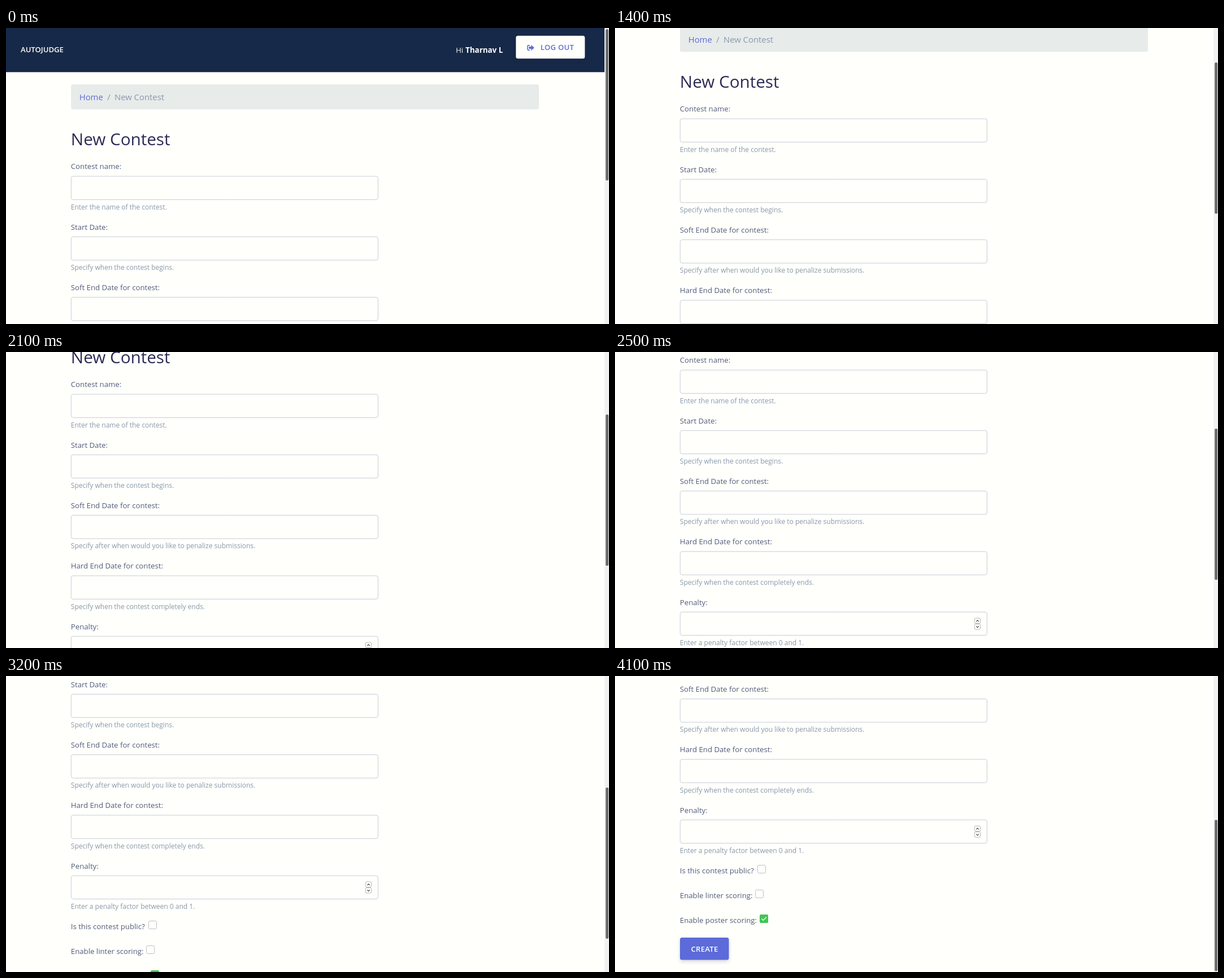
Recreate the animation shown at these times as an HTML page with a canvas. Size 1067 px wide and 525 px high, loop 6.1 s.

```html
<!DOCTYPE html>
<html lang="en">
<head>
<meta charset="utf-8">
<title>New Contest</title>
<style>
  html, body { margin: 0; width: 100%; height: 100%; overflow: hidden; background: #fffffc; }
  canvas { display: block; }
</style>
</head>
<body>
<canvas id="stage" width="1067" height="525"></canvas>
<script>
const ctx = document.getElementById('stage').getContext('2d');
const W = 1067, H = 525, LOOP = 6100, STEP = 100, LEFT = 114.8;
const PAPER = '#fffffc', NAVY = '#172948', INDIGO = '#5c6bd9',
      SLATE = '#525c7a', MUTED = '#8898aa', LINE = '#c9ccd6';

// Scroll offset over time: [ms, px]
const KEYS = [[900, 0], [1000, 2], [1200, 44], [1400, 102], [1600, 160], [1700, 160],
  [1800, 162], [1900, 162], [2100, 188], [2900, 278], [3500, 393], [4100, 437]];
const MAX_SCROLL = 437;

const FIELDS = [
  ['Contest name:', 'Enter the name of the contest.'],
  ['Start Date:', 'Specify when the contest begins.'],
  ['Soft End Date for contest:', 'Specify after when would you like to penalize submissions.'],
  ['Hard End Date for contest:', 'Specify when the contest completely ends.'],
  ['Penalty:', 'Enter a penalty factor between 0 and 1.']
];
const PITCH = 107.3;

const secant = i => (KEYS[i + 1][1] - KEYS[i][1]) / (KEYS[i + 1][0] - KEYS[i][0]);

// Harmonic mean keeps the curve monotone
function slope(i) {
  if (i === 0 || i === KEYS.length - 1) return 0;
  const a = secant(i - 1), b = secant(i);
  return a * b > 0 ? 2 * a * b / (a + b) : 0;
}

function scrollAt(t) {
  if (t <= KEYS[0][0]) return 0;
  const i = KEYS.findIndex(k => k[0] >= t) - 1;
  if (i < 0) return MAX_SCROLL;
  const [t0, a] = KEYS[i], [t1, b] = KEYS[i + 1];
  const d = t1 - t0, u = (t - t0) / d, v = 1 - u;
  return Math.round(a * v * v * (1 + 2 * u) + b * u * u * (3 - 2 * u) +
    d * u * v * (v * slope(i) - u * slope(i + 1)));
}

function text(str, x, y, size, color, weight = 400, spacing = 0) {
  ctx.font = `${weight} ${size}px "Open Sans", sans-serif`;
  ctx.letterSpacing = spacing + 'px';
  ctx.fillStyle = color;
  ctx.fillText(str, x, y);
}

function box(x, y, w, h, r, fill, stroke) {
  ctx.beginPath();
  ctx.roundRect(x, y, w, h, r);
  if (fill) { ctx.fillStyle = fill; ctx.fill(); }
  if (stroke) { ctx.strokeStyle = stroke; ctx.lineWidth = 1; ctx.stroke(); }
}

function polyline(points, color, width) {
  ctx.beginPath();
  points.forEach(([x, y]) => ctx.lineTo(x, y));
  ctx.strokeStyle = color;
  ctx.lineWidth = width;
  ctx.stroke();
}

function button(x, y, w, h, fill) {
  ctx.save();
  ctx.shadowColor = 'rgba(25,30,60,.18)';
  ctx.shadowBlur = 6;
  ctx.shadowOffsetY = 3;
  box(x, y, w, h, 3.5, fill);
  ctx.restore();
}

function exitIcon(x, y) {
  ctx.save();
  ctx.translate(x, y);
  ctx.lineJoin = 'round';
  ctx.beginPath();
  ctx.moveTo(4.8, 2.4);
  ctx.lineTo(2.4, 2.4);
  ctx.quadraticCurveTo(.8, 2.4, .8, 4);
  ctx.lineTo(.8, 9);
  ctx.quadraticCurveTo(.8, 10.6, 2.4, 10.6);
  ctx.lineTo(4.8, 10.6);
  ctx.strokeStyle = ctx.fillStyle = INDIGO;
  ctx.lineWidth = 1.6;
  ctx.stroke();
  ctx.beginPath();
  [[3.6, 5], [7.7, 5], [7.7, 2.2], [12.3, 6.5], [7.7, 10.8], [7.7, 8], [3.6, 8]]
    .forEach(([px, py]) => ctx.lineTo(px, py));
  ctx.closePath();
  ctx.lineWidth = .8;
  ctx.fill();
  ctx.stroke();
  ctx.restore();
}

function header() {
  ctx.fillStyle = NAVY;
  ctx.fillRect(0, 0, 1059, 78.3);
  text('AUTOJUDGE', 26, 43.2, 13.1, '#fffffc', 600);
  text('Hi', 796, 44.2, 13.3, '#f2f3f5');
  text('Tharnav L', 813, 44.2, 13.4, '#fffffc', 700);
  button(902.3, 13.8, 122, 40.4, PAPER);
  exitIcon(922, 28.5);
  text('LOG OUT', 945.8, 38.8, 13, INDIGO, 600, .35);
}

function breadcrumb() {
  box(115, 100, 828, 44.3, 3.5, '#e7ebea');
  text('Home', 129.7, 128, 14.85, INDIGO);
  text('/', 179.2, 128, 14.85, MUTED);
  text('New Contest', 192, 128, 14.85, MUTED);
}

function spinner(y) {
  [0, 1].forEach(i => {
    const top = y + i * 10.5, dir = i ? -1 : 1, mid = top + 5;
    box(636.3, top, 10.2, 9.5, 2, null, '#b4b4b6');
    polyline([[639.2, mid + 1.2 * dir], [641.5, mid - 1.1 * dir], [643.8, mid + 1.2 * dir]], '#444', 1.2);
  });
}

function checkbox(label, baseline, x, y, checked) {
  text(label, LEFT, baseline, 13.2, SLATE);
  if (!checked) return box(x + .5, y + .5, 14, 14, 2, PAPER, '#c0c0c4');
  box(x, y, 15, 15, 2, '#43c453');
  polyline([[x + 3.2, y + 7.6], [x + 6.2, y + 10.4], [x + 11.8, y + 4.8]], '#fff', 1.4);
}

function form() {
  text('New Contest', LEFT, 207.7, 29.65, '#2d2b57');
  FIELDS.forEach(([label, help], i) => {
    const dy = i * PITCH;
    text(label, LEFT, 250.4 + dy, 13.2, SLATE);
    box(115.3, 263 + dy, 543, 41.4, 3.5, PAPER, LINE);
    text(help, LEFT, 321.8 + dy, 12, MUTED);
  });
  spinner(703);
  checkbox('Is this contest public?', 786.5, 252, 772);
  checkbox('Enable linter scoring:', 830.7, 248, 816);
  checkbox('Enable poster scoring:', 874.5, 256, 860, true);
  button(115, 901, 86.5, 39.5, INDIGO);
  text('CREATE', 134.4, 926, 13, '#fffffc', 600, .35);
}

function scrollbar(s) {
  ctx.fillStyle = '#f1f1f1';
  ctx.fillRect(1059, 0, 8, H);
  box(1061.1, 2 + s * 253 / MAX_SCROLL, 5, 268.4, 2.5, '#6c6c6d');
}

function draw(now) {
  const t = Math.floor(now % LOOP / STEP) * STEP;
  const s = scrollAt(t);
  ctx.fillStyle = PAPER;
  ctx.fillRect(0, 0, W, H);
  ctx.save();
  ctx.translate(0, -s);
  header();
  breadcrumb();
  form();
  ctx.restore();
  scrollbar(s);
}

const start = performance.now();
function tick() {
  draw(performance.now() - start);
  requestAnimationFrame(tick);
}
tick();
</script>
</body>
</html>
```
